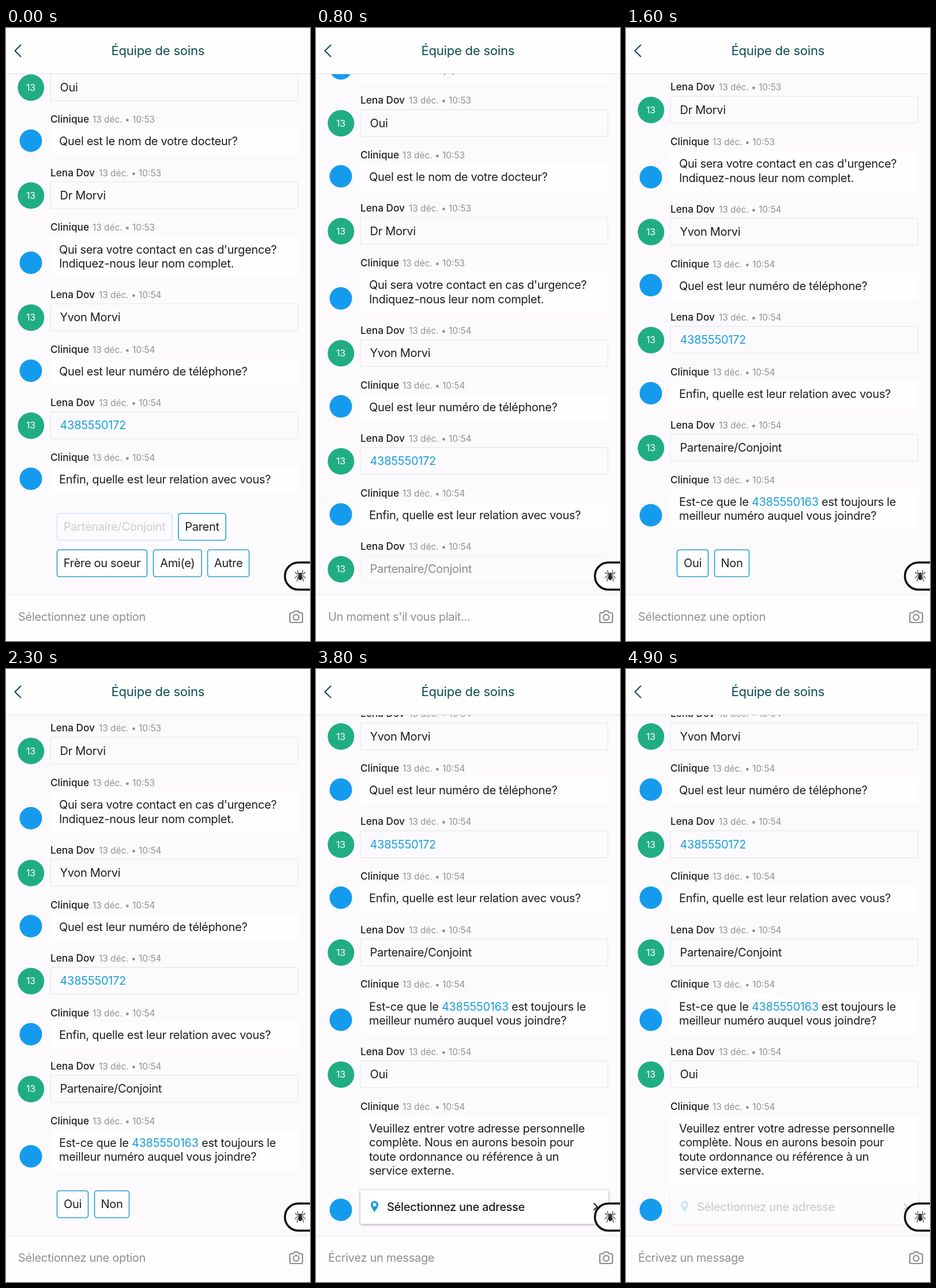
These frames come from a looping animation (527 by 1062 pixels, 5000 ms). An HTML page:

```html
<!DOCTYPE html>
<html lang="fr">
<head>
<meta charset="utf-8">
<title>Équipe de soins</title>
<style>
  html, body { margin: 0; height: 100%; overflow: hidden; background: #fff; }
  svg { display: block; width: 100vw; height: 100vh; }
  text { font: 20px Inter, sans-serif; font-optical-sizing: none; letter-spacing: -.3px; fill: #1e1e20; }
  .title { font-size: 22px; letter-spacing: -.2px; fill: #0d4d50; text-anchor: middle; }
  .name { font-size: 17.2px; font-weight: 500; letter-spacing: 0; }
  .date { font-size: 15.4px; letter-spacing: 0; fill: #919196; }
  .badge { font-size: 16px; fill: #fff; text-anchor: middle; }
  .link { fill: #1b9fdb; }
  .hint { fill: #8f8f94; }
  .button rect { fill: #fefdff; stroke: #25a1d1; stroke-width: 1.6; }
  .button text { text-anchor: middle; }
  .reply rect { fill: #fcfafd; stroke: #ececef; stroke-width: 1.6; }
  .card rect { fill: #fff; filter: drop-shadow(0 1px 2px rgba(0, 0, 0, .38)); }
  .card text { font-weight: 500; }
  .line { fill: none; stroke-linecap: round; stroke-linejoin: round; }
</style>
</head>
<body>
<svg viewBox="0 0 527 1062" preserveAspectRatio="none">
  <rect width="527" height="1062" fill="#fcfafd"/>
  <g id="chat"></g>
  <g id="choices"></g>

  <rect width="527" height="79" fill="#fefefe"/>
  <path d="M0 79.2H527M0 982H527" stroke="#e7e7ea" stroke-width="1.5"/>
  <path class="line" d="M25.500 29.500L15.500 39.500L25.500 49.500" stroke="#0d4d50" stroke-width="2"/>
  <text class="title" x="263.300" y="47">Équipe de soins</text>

  <rect y="982.700" width="527" height="80" fill="#fefefe"/>
  <text class="hint" id="hint" x="21" y="1027"></text>
  <g class="line" stroke="#8d8d92" stroke-width="2.200">
    <path d="M494.500 1013H498L500 1010H506L508 1013H511.500Q514 1013 514 1015.500V1027.500Q514 1030 511.500 1030H494.500Q492 1030 492 1027.500V1015.500Q492 1013 494.500 1013Z"/>
    <circle cx="503" cy="1021" r="4.800"/>
  </g>

  <rect x="483.500" y="926" width="80" height="47" rx="23.500" fill="#fff" stroke="#101012" stroke-width="3.600"/>
  <g id="spider" transform="translate(510 949)"></g>
</svg>
<script>
const LOOP = 5000, LINE = 24.4;
const SENT = 100, SAVED = 900, ASKED = 1600, TAPPED = 2400;
const SENT2 = 2500, SAVED2 = 3000, ASKED2 = 3700, CARD_TAP = 4900;
const PHONE = "4385550172", PHONE2 = "4385550163";
const $ = id => document.getElementById(id);
const link = s => `<tspan class="link">${s}</tspan>`;

// from: time the message appears; saved: time a sent reply turns solid
const messages = [
  { lines: ["Avez-vous un(e) docteur?"], time: "10:53" },
  { reply: "Oui", time: "10:53" },
  { lines: ["Quel est le nom de votre docteur?"], time: "10:53" },
  { reply: "Dr Morvi", time: "10:53" },
  { lines: ["Qui sera votre contact en cas d'urgence?", "Indiquez-nous leur nom complet."], time: "10:53" },
  { reply: "Yvon Morvi" },
  { lines: ["Quel est leur numéro de téléphone?"] },
  { reply: link(PHONE) },
  { lines: ["Enfin, quelle est leur relation avec vous?"] },
  { reply: "Partenaire/Conjoint", from: SENT, saved: SAVED },
  { lines: [`Est-ce que le ${link(PHONE2)} est toujours le`, "meilleur numéro auquel vous joindre?"], from: ASKED },
  { reply: "Oui", from: SENT2, saved: SAVED2 },
  { lines: ["Veuillez entrer votre adresse personnelle", "complète. Nous en aurons besoin pour",
            "toute ordonnance ou référence à un", "service externe."], from: ASKED2, card: true }
];

const heading = (name, x, time = "10:54") =>
  `<text class="name" x="77" y="6.200">${name}</text><text class="date" x="${x}" y="6.200">13 déc. • ${time}</text>`;

const replyMarkup = m => heading("Lena Dov", 161, m.time) +
  `<circle cx="43.300" cy="40" r="23" fill="#21ad82"/><text class="badge" x="43" y="45.600">13</text>
   <g class="reply"><rect x="77" y="16.200" width="429" height="46.500" rx="3"/>
   <text x="93.500" y="46.600">${m.reply}</text></g>`;

const cardMarkup = `<g class="card"><rect x="77" y="145" width="430" height="59" rx="2"/>
  <path fill="#1b9fdb" fill-rule="evenodd" d="M101.500 184C99 178 95 175.500 95 170.500A6.500 6.500 0 0 1 108 170.500C108 175.500 104 178 101.500 184ZM101.500 167.500A3 3 0 1 0 101.500 173.500A3 3 0 1 0 101.500 167.500Z"/>
  <text x="123" y="181">Sélectionnez une adresse</text>
  <path class="line" d="M482 168.500L487.500 174L482 179.500" stroke="#1e1e20" stroke-width="2"/></g>`;

function clinicMarkup(m) {
  const extra = (m.lines.length - 1) * LINE;
  const text = m.lines.map((s, i) => `<text x="92" y="${45.5 + i * LINE}">${s}</text>`).join("");
  return heading("Clinique", 150, m.time) +
    `<circle cx="43" cy="${m.card ? 179.5 : 37.3 + extra}" r="19.500" fill="#159bee"/>
     <rect x="77" y="16" width="430" height="${46 + extra}" rx="3" fill="#fefdff"/>` +
    text + (m.card ? cardMarkup : "");
}

let top_ = 32.6;
for (const m of messages) {
  m.node = document.createElementNS("http://www.w3.org/2000/svg", "g");
  m.node.setAttribute("transform", `translate(0 ${top_})`);
  m.node.innerHTML = m.reply ? replyMarkup(m) : clinicMarkup(m);
  $("chat").append(m.node);
  top_ += m.reply ? 94.7 : 92.4 + (m.lines.length - 1) * LINE;
}

const button = (label, x, right, y) =>
  `<g class="button"><rect x="${x}" y="${y}" width="${right - x}" height="46.500" rx="4"/>
   <text x="${(x + right) / 2}" y="${y + 30.2}">${label}</text></g>`;
$("choices").innerHTML =
  `<g>${button("Partenaire/Conjoint", 88.5, 288, 841)}${button("Parent", 299, 381, 841)}
   ${button("Frère ou soeur", 88.5, 244.5, 904)}${button("Ami(e)", 255.5, 339, 904)}${button("Autre", 349.5, 421.5, 904)}</g>
   <g>${button("Oui", 88.5, 142.5, 904)}${button("Non", 153.5, 213.5, 904)}</g>`;
const [relations, yesNo] = $("choices").children;
relations.firstElementChild.style.opacity = .2;

const legs = `<path class="line" d="M1.500 -3L4 -5.500L4.500 -9.500M2 -2L6 -3.500L8.500 -6M2 -.5L6 .5L9 4M1.500 1L4.500 4L5.500 9.500" stroke="#252528" stroke-width="1.100"/>`;
$("spider").innerHTML = `${legs}<g transform="scale(-1 1)">${legs}</g>
  <ellipse cy="3" rx="3.200" ry="4.500" fill="#252528"/><circle cy="-3" r="2.500" fill="#3a3a3d"/>`;

const show = (node, on) => { node.style.display = on ? "" : "none"; };

function draw(t) {
  const scroll = t < SENT ? -61.8 : t < ASKED ? 0 : t < SENT2 ? -210 : t < ASKED2 ? -211.3 : -446.5;
  $("chat").setAttribute("transform", `translate(0 ${scroll})`);
  for (const m of messages) {
    show(m.node, t >= (m.from || 0));
    if (m.saved) m.node.querySelector(".reply").style.opacity = t < m.saved ? .5 : 1;
    if (m.card) m.node.querySelector(".card").style.opacity = t < CARD_TAP ? 1 : .2;
  }
  show(relations, t < SENT);
  show(yesNo, t >= ASKED && t < SENT2);
  yesNo.firstElementChild.style.opacity = t < TAPPED ? 1 : .2;
  const choosing = t < SENT || (t >= ASKED && t < SENT2);
  $("hint").textContent = choosing ? "Sélectionnez une option"
    : t < ASKED2 ? "Un moment s'il vous plait..." : "Écrivez un message";
}

function tick() {
  draw(performance.now() % LOOP);
  requestAnimationFrame(tick);
}
tick();
</script>
</body>
</html>
```
